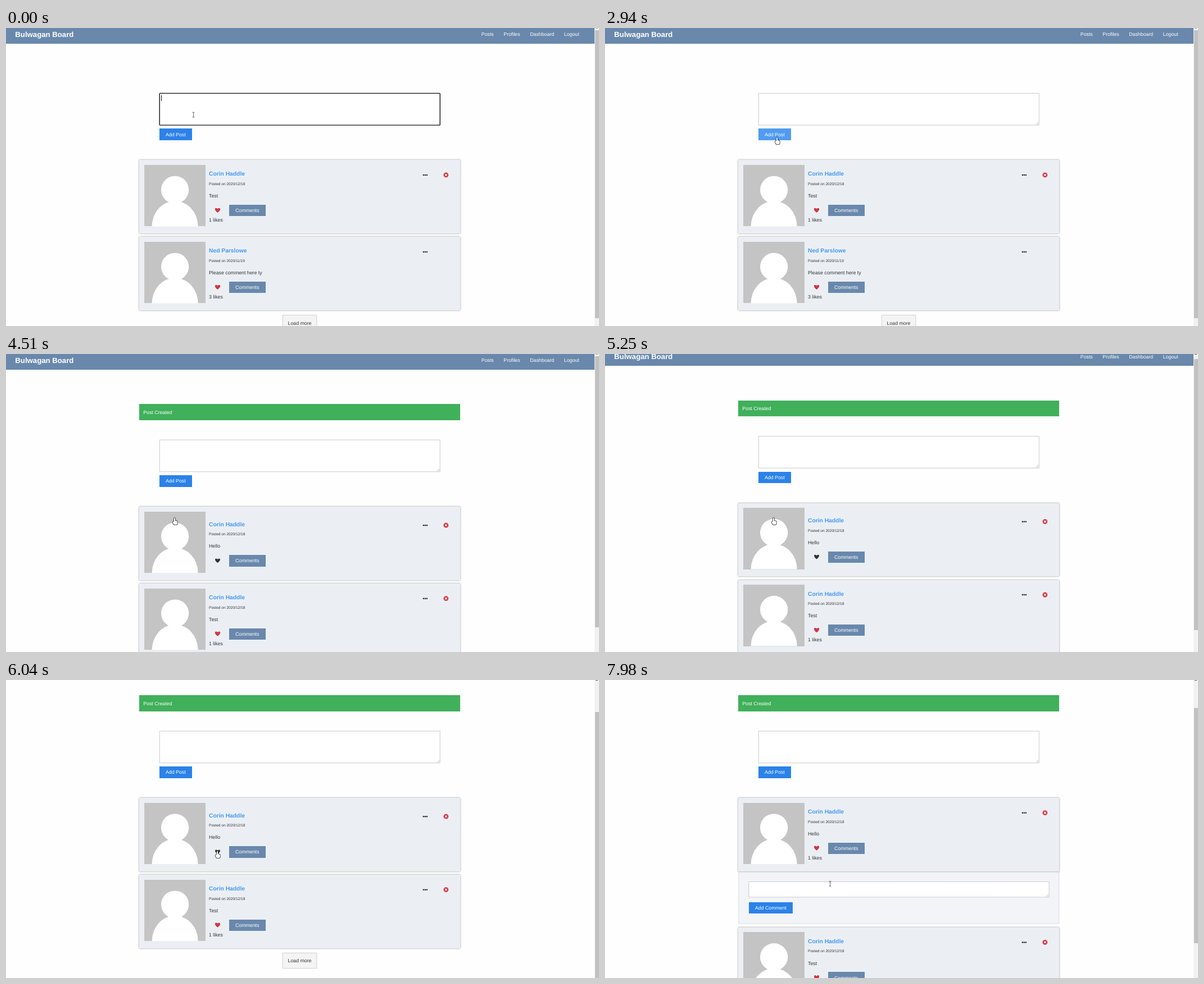
An HTML page with a canvas that plays this animation: 1055 by 531 pixels, repeating every 8 s.

```html
<!DOCTYPE html>
<html lang="en">
<head>
<meta charset="utf-8">
<title>Forum</title>
<style>
html, body { margin: 0; width: 100%; height: 100%; overflow: hidden; background: #fefefe; }
canvas { display: block; }
</style>
</head>
<body>
<canvas id="stage" width="1055" height="531"></canvas>
<script>
const ctx = document.getElementById('stage').getContext('2d');
const LOOP = 8000, BLURRED = 2900, POSTED = 3800, SCROLLED = 5197, LIKED = 6500, OPENED = 6970, FADE = 700;
const PAGE = '#fefefe', STEEL = '#6988ac', BLUE = '#2b82e9', RED = '#da3440', INK = '#333';
const ARIAL = '"Liberation Sans", Arial, sans-serif';
const MONO = '"Liberation Mono", monospace';
const KEYS = [170, 560, 740, 900, 1140];

// Pointer moves
const MOVES = [
  { from: 2160, to: 2900, x: 306, y: 195 },
  { from: 3800, to: 4360, x: 300, y: 292 },
  { from: 5260, to: 6040, x: 376, y: 305 },
  { from: 6500, to: 6880, x: 408.5, y: 302.5 },
  { from: 7500, to: 7960, x: 400.5, y: 363 }
];

let mouse, cursor;

const ramp = (t, start, length) => Math.max(0, Math.min(1, (t - start) / length));
const easeOut = p => p * (2 - p);
const easeInOut = p => p * p * (3 - 2 * p);

function pointerAt(t) {
  let x = 333.5, y = 154.5;
  for (const move of MOVES) {
    const p = easeOut(ramp(t, move.from, move.to - move.from));
    x += (move.x - x) * p;
    y += (move.y - y) * p;
  }
  return [x, y];
}

function hit(x, y, w, h, kind) {
  const [mx, my] = mouse;
  const inside = mx >= x && mx <= x + w && my >= y && my <= y + h;
  if (inside) cursor = kind;
  return inside;
}

// Edges snap to whole pixels
function rect(x, y, w, h, fill) {
  const left = Math.round(x), top = Math.round(y);
  ctx.fillStyle = fill;
  ctx.fillRect(left, top, Math.round(x + w) - left, Math.round(y + h) - top);
}

function frame(x, y, w, h, color, width, radius = 0) {
  ctx.strokeStyle = color;
  ctx.lineWidth = width;
  ctx.beginPath();
  ctx.roundRect(x, y, w, h, radius);
  ctx.stroke();
}

function disc(x, y, r, fill) {
  ctx.fillStyle = fill;
  ctx.beginPath();
  ctx.arc(x, y, r, 0, 7);
  ctx.fill();
}

function lines(color, width, ...segments) {
  ctx.strokeStyle = color;
  ctx.lineWidth = width;
  ctx.beginPath();
  for (const [x1, y1, x2, y2] of segments) {
    ctx.moveTo(x1, y1);
    ctx.lineTo(x2, y2);
  }
  ctx.stroke();
}

// Returns the width of the text
function text(str, x, y, { size = 8.79, fill = INK, bold = false, family = ARIAL } = {}) {
  ctx.font = `${bold ? 'bold ' : ''}${size}px ${family}`;
  ctx.fillStyle = fill;
  ctx.fillText(str, x, y);
  return ctx.measureText(str).width;
}

function button(label, x, y, fill, hover) {
  const pad = 11.4, h = 20.5;
  ctx.font = '8.79px ' + ARIAL;
  const w = ctx.measureText(label).width + 2 * pad;
  rect(x, y, w, h, hit(x, y, w, h, 'hand') ? hover : fill);
  text(label, x + pad, y + 13.3, { fill: '#fff' });
}

function textarea(x, y, w, h, focused) {
  hit(x, y, w, h, 'beam');
  rect(x, y, w, h, '#fff');
  if (focused) frame(x, y, w, h, '#101010', 1.4, 1.2);
  else frame(x, y, w, h, '#c4c4c4', .9);
  const r = x + w - 1, b = y + h - 1;
  for (const d of [2, 4.5]) lines('#999', .6, [r - d, b, r, b - d]);
}

function heart(x, y, fill) {
  ctx.fillStyle = fill;
  ctx.beginPath();
  for (const side of [-1, 1]) {
    ctx.moveTo(x, y + 4);
    ctx.bezierCurveTo(x + side * 7.6, y - 1.8, x + side * 4, y - 6, x, y - 2.3);
  }
  ctx.fill();
}

function avatar(x, y) {
  const size = 109.6, cx = x + size / 2;
  hit(x, y, size, size, 'hand');
  rect(x, y, size, size, '#c4c4c4');
  disc(cx, y + 44.5, 24.6, '#fff');
  ctx.beginPath();
  ctx.ellipse(cx, y + size, 41, 45, 0, Math.PI, 2 * Math.PI);
  ctx.fill();
}

function card(y, { name, date, body, likes, own, red = 1 }) {
  ctx.save();
  ctx.shadowColor = 'rgba(0,0,0,.45)';
  ctx.shadowBlur = 2.8;
  rect(237.4, y, 570.9, 130.4, '#ebeff4');
  ctx.restore();
  avatar(245.8, y + 8.4);
  if (!likes) y += 6.6;
  text(name, 361, y + 28, { size: 10.29, bold: true, fill: '#449af2' });
  text('Posted on ' + date, 361, y + 44.6, { size: 6.59 });
  text(body, 361, y + 66.7);
  hit(367, y + 81, 19, 16, 'hand');
  heart(376.5, y + 89.4, INK);
  ctx.globalAlpha = red;
  heart(376.5, y + 89.4, RED);
  ctx.globalAlpha = 1;
  button('Comments', 396.6, y + 79.4, STEEL, '#849dbb');
  if (likes) text(likes + ' likes', 361, y + 109.8);
  for (const dx of [-3, 0, 3]) disc(745.8 + dx, y + 26.6, 1.25, '#222');
  if (own) {
    const cx = 782.8, cy = y + 26.5, d = 1.6;
    disc(cx, cy, 4.4, RED);
    for (const s of [-d, d]) lines('#fff', 1.3, [cx - d, cy - s, cx + d, cy + s]);
  }
}

// Fades what lies below by covering it with the page colour
function veil(y, h, shown) {
  ctx.globalAlpha = 1 - shown;
  rect(232, y, 582, h, PAGE);
  ctx.globalAlpha = 1;
}

function commentPanel(y) {
  rect(237.6, y + 130, 570.4, 94, '#f2f4f8');
  frame(237.8, y + 130, 570, 94, '#cdd0d6', .7);
  textarea(255.8, y + 149.3, 534.2, 27.5);
  button('Add Comment', 255.5, y + 185.7, BLUE, '#509cf0');
}

function navbar(y) {
  rect(0, y - 6, 1047, 33.5, STEEL);
  text('Bulwagan Board', 16.3, y + 15.5, { size: 13.19, bold: true, fill: '#fff' });
  let x = 845.8;
  for (const label of ['Posts', 'Profiles', 'Dashboard', 'Logout']) {
    x += text(label, x, y + 14.2, { fill: '#fff' }) + 17.6;
  }
}

function scrollbar(scroll, length) {
  rect(1047, 0, 8, 531, '#f1f1f1');
  rect(1048, 3.8 + scroll * length / 562, 7, length, '#c1c1c1');
  rect(1049, 0, 4, 1, scroll ? '#505050' : '#a3a3a3');
}

function composer(t, y) {
  const focused = t < BLURRED;
  textarea(273.2, y + 116.4, 499, 56.7, focused);
  if (focused) {
    const typed = KEYS.filter(k => t >= k).length;
    text('Hello'.slice(0, typed), 276.4, y + 128, { size: 8.05, family: MONO, fill: '#111' });
    if (t < 1690) rect(276.3 + typed * 4.83, y + 120.3, 1, 9.6, '#111');
  }
  button('Add Post', 272.6, y + 179.4, BLUE, '#509cf0');
}

// Outlines the union of the parts added to the path
function outlined(addParts) {
  ctx.beginPath();
  addParts();
  ctx.strokeStyle = '#222';
  ctx.lineWidth = 1.5;
  ctx.stroke();
  ctx.fillStyle = '#fff';
  ctx.fill();
}

const cursors = {
  beam: () => lines('#444', .8, [0, -4, 0, 4], [-2, -4.2, 2, -4.2], [-2, 4.2, 2, 4.2]),
  hand: () => outlined(() => {
    ctx.roundRect(-1, 0, 2, 9, 1);
    ctx.roundRect(-2.2, 5.2, 7, 7, 2.2);
    ctx.roundRect(-3.5, 6.8, 3, 3, 1.2);
  }),
  arrow: () => outlined(() => {
    ctx.roundRect(2, 6, 1.6, 4.8, .3);
    ctx.moveTo(0, 0);
    ctx.lineTo(6.6, 6.8);
    ctx.lineTo(0, 9.4);
    ctx.closePath();
  })
};

function draw(t) {
  const posted = t >= POSTED, opened = t >= OPENED;
  const scroll = 62 * easeInOut(ramp(t, SCROLLED, 267));
  const shift = posted ? 36.7 : 0;
  mouse = pointerAt(t);
  cursor = 'arrow';

  ctx.textRendering = 'geometricPrecision';
  rect(0, 0, 1055, 531, PAGE);
  navbar(-scroll);
  if (posted) {
    rect(237.4, 89.4 - scroll, 570.8, 28.2, '#40b05a');
    text('Post Created', 244.2, 106.6 - scroll, { fill: '#fff' });
  }
  composer(t, shift - scroll);

  let y = 235.4 + shift - scroll;
  const first = { name: 'Corin Haddle', date: '2020/12/18', body: 'Test', likes: 1, own: true };
  if (posted) {
    const shown = ramp(t, OPENED, FADE);
    if (opened) {
      commentPanel(y);
      veil(y + 129, 96, shown);
    }
    card(y, { ...first, body: 'Hello', likes: t >= LIKED ? 1 : 0, red: shown });
    veil(y - 4, 138, ramp(t, POSTED, FADE));
    y += opened ? 230.7 : 137;
    card(y, first);
  } else {
    card(y, first);
    y += 137;
    card(y, { name: 'Ned Parslowe', date: '2020/11/19', body: 'Please comment here ty', likes: 3 });
  }

  rect(492, y + 139, 61, 28, '#f4f4f4');
  frame(492.2, y + 139.2, 60.6, 27.6, '#c8c8c8', .8);
  text('Load more', 501.5, y + 156.2);

  scrollbar(scroll, opened ? 419 : posted ? 483 : 513);
  ctx.save();
  ctx.translate(...mouse);
  cursors[cursor]();
  ctx.restore();
}

const start = performance.now();
function tick() {
  draw((performance.now() - start) % LOOP);
  requestAnimationFrame(tick);
}
tick();
</script>
</body>
</html>
```
